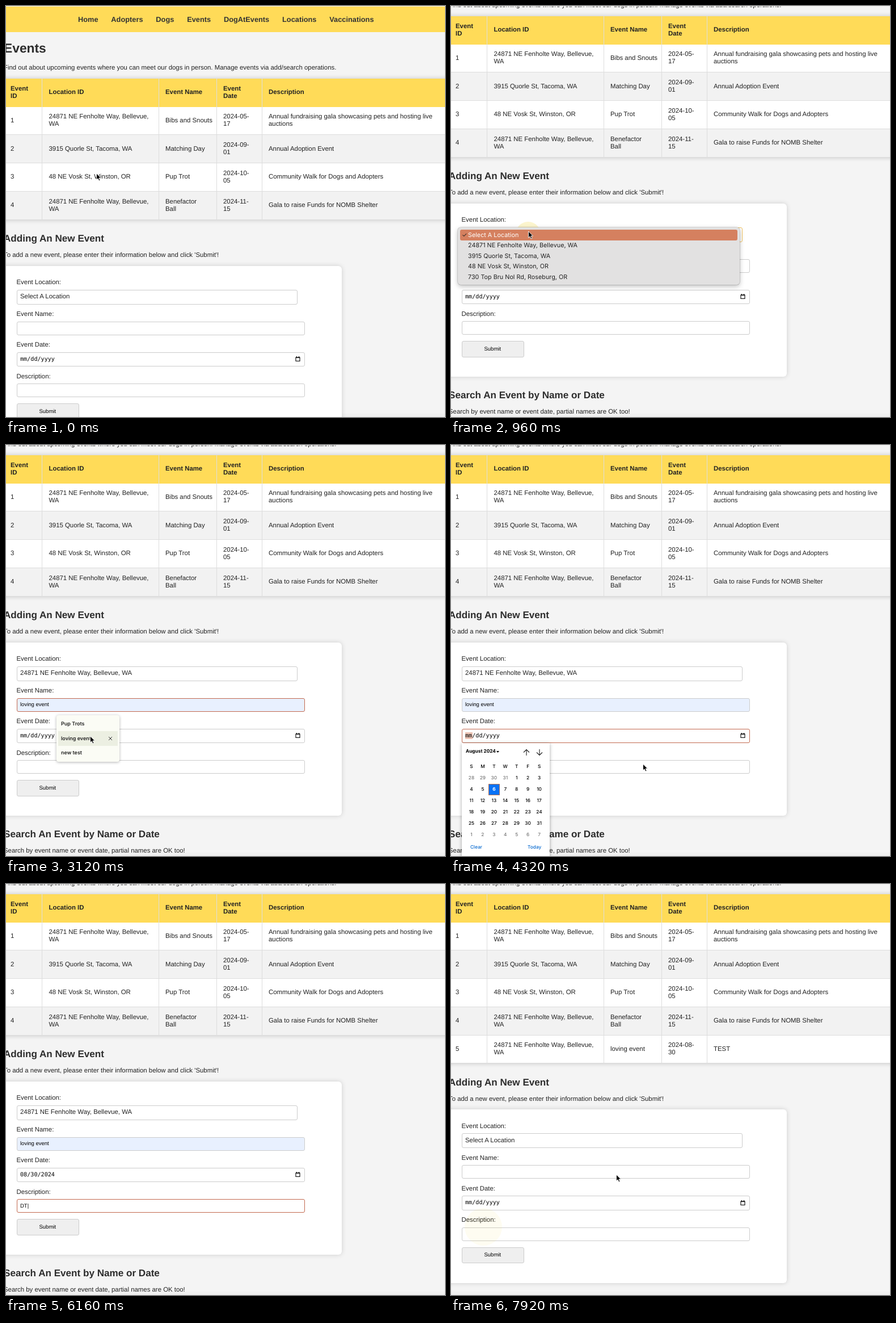
An HTML page that plays this animation: 774 px wide and 724 px high, repeating every 8000 ms.

```html
<!DOCTYPE html>
<html lang="en">
<head>
<meta charset="utf-8">
<title>Events</title>
<style>
html, body { margin: 0; width: 100%; height: 100%; overflow: hidden; }
#stage { position: relative; width: 774px; height: 724px; overflow: hidden; background: #f4f4f4;
  font: 11.4px/13px "Liberation Sans", Arial, sans-serif; color: #222; text-rendering: geometricPrecision; }
#stage div, #stage svg { position: absolute; box-sizing: border-box; }
.t { white-space: pre; }
.b { font-weight: bold; }
.h1 { font-size: 22.8px; font-weight: bold; color: #2d2d2d; }
.h2 { font-size: 17.1px; font-weight: bold; color: #2d2d2d; }
.small { font-size: 9.5px; color: #000; }
.mono { font-family: "DejaVu Sans Mono", monospace; font-size: 10.15px; color: #000; }
#page, #lower { left: 0; width: 774px; }
#lower { height: 0; }
nav { position: absolute; left: 127px; top: 17px; display: flex; gap: 22.8px; font: bold 12.8px/13px "Liberation Sans", Arial, sans-serif; color: #333; }
.yellow { background: #ffdb58; }
.table { box-shadow: 0 0 8px rgba(0,0,0,.2); background: #fff; }
.row { left: -10px; width: 800px; height: 49.75px; border-bottom: 1px solid #ddd; }
.rule { width: 1px; background: #ddd; }
.card { background: #fff; border-radius: 6px; box-shadow: 0 0 8px rgba(0,0,0,.16); }
.field { background: #fff; border: 1px solid #ccc; border-radius: 3px; }
.field.focus { border: 1.5px solid #c2694f; }
.field.gold { border-color: #f3c462; }
.field.filled { background: #e8f0fe; }
#submit { background: #efefef; border: 1px solid #ccc; border-radius: 3px; }
#menu { z-index: 5; left: 12px; top: 390px; width: 497px; height: 100.5px; border-radius: 5px; background: #e2e1e1;
  box-shadow: 0 0 0 .5px rgba(0,0,0,.25), 0 3px 9px rgba(0,0,0,.25); font: 10.8px/13px Inter, sans-serif; }
#menu .mark { left: 4px; width: 489px; height: 18.5px; border-radius: 3px; background: #d5805f; }
#popup { z-index: 5; left: 89px; top: 476px; width: 111px; height: 82px; border-radius: 4px; background: #fbfcf5;
  box-shadow: 0 1px 5px rgba(0,0,0,.3); font: 600 9px/13px Inter, sans-serif; }
#popup .mark { left: 3px; width: 105px; height: 26px; background: #ecefe2; }
#cal { z-index: 5; left: 19px; top: 525px; width: 155px; height: 210px; background: #fff;
  box-shadow: 0 1px 6px rgba(0,0,0,.35); font: 500 8.3px/13px Inter, sans-serif; color: #000; }
.day { width: 20px; text-align: center; }
.out { color: #777; }
.link { color: #0a6bd0; }
.pick { background: #0a72f5; border: 1px solid #b5704f; }
#cal .white { color: #fff; font-weight: bold; }
#ripple { border-radius: 50%; background: #f1d63c; }
#cursor { z-index: 10; }
</style>
</head>
<body>
<div id="stage"></div>
<script>
const text = (x, y, str, cls = "", id = "") =>
  `<div class="t ${cls}" id="${id}" style="left:${x}px;top:${y - 6.5 * str.split("\n").length}px">${str}</div>`;
const box = (x, y, w, h, cls, id = "") =>
  `<div class="${cls}" id="${id}" style="left:${x}px;top:${y}px;width:${w}px;height:${h}px"></div>`;
const range = (n, fn) => Array.from({ length: n }, (_, i) => fn(i)).join("");

const HOME = "24871 NE Fenholte Way, Bellevue,";
const places = ["Select A Location", `${HOME} WA`, "3915 Quorle St, Tacoma, WA",
  "48 NE Vosk St, Winston, OR", "730 Top Bru Nol Rd, Roseburg, OR"];
const events = [
  [1, `${HOME}\nWA`, "Bibs and Snouts", "2024-05-\n17", "Annual fundraising gala showcasing pets and hosting live\nauctions"],
  [2, places[2], "Matching Day", "2024-09-\n01", "Annual Adoption Event"],
  [3, places[3], "Pup Trot", "2024-10-\n05", "Community Walk for Dogs and Adopters"],
  [4, `${HOME}\nWA`, "Benefactor\nBall", "2024-11-\n15", "Gala to raise Funds for NOMB Shelter"],
  [5, `${HOME}\nWA`, "loving event", "2024-08-\n30", "TEST"],
];
const columns = [8, 75.5, 281, 383, 463];
const ROW = 49.75;

const cells = (row, y, cls) => row.map((str, i) => text(columns[i], y, String(str), cls)).join("");
const eventRow = (row, i) =>
  `<div id="row${i}" style="left:0;top:0">` +
  `<div class="row" style="top:${177.5 + ROW * i}px;background:${i % 2 ? "#f2f2f2" : "#fff"}"></div>` +
  cells(row, 202.3 + ROW * i) + "</div>";

const header = box(0, 0, 774, 45.5, "yellow") +
  `<nav>${["Home", "Adopters", "Dogs", "Events", "DogAtEvents", "Locations", "Vaccinations"].map(s => `<span>${s}</span>`).join("")}</nav>` +
  text(-4, 74.5, "Events", "h1") +
  text(-4, 109.5, "Find out about upcoming events where you can meet our dogs in person. Manage events via add/search operations.");

const table = box(-10, 127.5, 800, 0, "table", "table") +
  box(-10, 127.5, 800, 50, "yellow") + events.map(eventRow).join("") +
  cells(["Event\nID", "Location ID", "Event Name", "Event\nDate", "Description"], 152.5, "b") +
  [63, 269, 371, 450.5].map(x => box(x, 127.5, 1, 0, "rule")).join("");

const dateIcon = `<svg style="left:510px;top:507px" width="9" height="10">
  <path d="M1 2h7v6.5h-7zM1 2.5h7M2.5 0v2M6.5 0v2" fill="none" stroke="#000" stroke-width="1.1"/></svg>`;

const form = text(-4, 299.5, "Adding An New Event", "h2") +
  text(-4, 329.5, "To add a new event, please enter their information below and click 'Submit'!") +
  box(-10, 347.5, 602, 305.5, "card") +
  text(18.5, 377.5, "Event Location:") + text(18.5, 433.5, "Event Name:") +
  text(18.5, 487.5, "Event Date:") + text(18.5, 543, "Description:") +
  box(18.5, 389.5, 495.5, 26, "field", "place") + text(25, 402.5, places[0], "", "placeText") +
  box(18.5, 445.5, 508, 24, "field", "name") + text(25, 457.5, " ", "small", "nameText") +
  box(18.5, 499.5, 508, 25.5, "field", "date") + box(25, 506, 12.5, 12, "", "month") +
  text(25, 512, "mm/dd/yyyy", "mono", "dateText") + dateIcon +
  box(18.5, 555, 508, 24, "field", "desc") + text(25, 567, " ", "small", "descText") +
  box(18.5, 590, 110, 28.5, "", "submit") + text(58.5, 604, "Submit", "small") +
  text(-4, 685.5, "Search An Event by Name or Date", "h2") +
  text(-4, 715.5, "Search by event name or event date, partial names are OK too!");

const menu = `<div id="menu"><div class="mark" id="menuMark"></div>${text(7, 13, "✓")}` +
  places.map((p, i) => text(18, 13 + 18.5 * i, p, "", `item${i}`)).join("") + "</div>";

const popup = `<div id="popup"><div class="mark" id="popupMark"></div>` +
  ["Pup Trots", "loving event", "new test"].map((s, i) => text(8, 15.5 + 25.5 * i, s)).join("") +
  `<svg id="cross" style="left:91px" width="8" height="8"><path d="M1 1l6 6M7 1l-6 6" stroke="#333" stroke-width="1"/></svg></div>`;

const dayCell = i => {
  const n = i - 3, label = n < 1 ? n + 31 : n > 31 ? n - 31 : n;
  const cls = n === 6 ? "white" : n < 1 || n > 31 ? "out" : "";
  return text(7 + 19.93 * (i % 7), 62.5 + 19.95 * Math.floor(i / 7), String(label), `day ${cls}`);
};
const arrow = (x, turn) => `<svg style="left:${x}px;top:10px" width="12" height="13">
  <path transform="rotate(${turn} 6 6.5)" d="M6 12V1.5M1 6.5l5-5l5 5" fill="none" stroke="#222" stroke-width="1.1"/></svg>`;
const calendar = `<div id="cal">${text(7, 15.5, "August 2024", "b")}` +
  `<svg style="left:61px;top:14px" width="6" height="4"><path d="M0 0h5l-2.500 3z"/></svg>` +
  arrow(108, 0) + arrow(131, 180) + box(47, 72, 20, 20, "pick") +
  range(7, i => text(7 + 19.93 * i, 42, "SMTWTFS"[i], "day")) + range(42, dayCell) +
  text(15, 184, "Clear", "link") + text(116, 184, "Today", "link") + "</div>";

const $ = id => document.getElementById(id);
$("stage").innerHTML = box(0, 718, 774, 6, "") +
  `<div id="page">${header}${table}<div id="lower">${form}${menu}${popup}${calendar}</div></div>` +
  `<div id="ripple"></div>` +
  `<svg id="cursor" width="13" height="18"><path d="M1.500 1v11.200l2.600-2.400 1.900 4.200 2-.9-1.900-4.100h3.500z" fill="#000" stroke="#fff" stroke-width=".9"/></svg>` +
  `<div style="z-index:11;left:0;top:0;width:774px;height:1px;background:#f2f2f0"></div>`;
$("stage").firstElementChild.style.background = "#f0f0f0";

const pointer = [[0, 159, 295], [480, 159, 295], [800, 136, 397], [960, 136, 397], [1360, 103, 418], [1600, 103, 420],
  [1760, 197, 428], [2000, 150, 455], [2400, 150, 458], [2880, 148, 513], [3200, 148, 513], [3760, 512, 510],
  [3920, 512, 510], [4320, 338, 562], [4960, 136, 665], [5200, 136, 665], [5600, 130, 566], [7280, 130, 566],
  [7520, 57, 602], [7600, 57, 602], [7920, 291, 512]];
const clicks = [[880, 136, 402], [1600, 103, 422], [2080, 150, 457], [3200, 148, 516],
  [3840, 514, 512], [5120, 136, 667], [5680, 130, 567], [7520, 57, 604]];
const typing = [[0, ""], [6080, "D"], [6160, "DT"], [6240, "D"], [6320, ""], [6640, "T"], [6880, "TE"], [7120, "TES"], [7200, "TEST"]];

const clamp = v => Math.min(1, Math.max(0, v));
const ease = p => p * p * (3 - 2 * p);
const within = (t, from, to) => t >= from && t < to;
const latest = (list, t) => list.filter(k => k[0] <= t).pop();
const show = (id, on) => { $(id).style.display = on ? "" : "none"; };

function along(path, t) {
  const a = latest(path, t), b = path[path.indexOf(a) + 1] || a;
  const p = ease(clamp((t - a[0]) / (b[0] - a[0] || 1)));
  return [a[1] + (b[1] - a[1]) * p, a[2] + (b[2] - a[2]) * p];
}

function drawPage(t, done) {
  $("page").style.top = -Math.round(110 * ease(clamp((t - 40) / 560))) + "px";
  $("lower").style.top = 110 + (done ? ROW : 0) + "px";
  const rows = done ? 5 : 4;
  $("table").style.height = 50 + ROW * rows + "px";
  document.querySelectorAll(".rule").forEach(r => { r.style.height = 50 + ROW * rows + "px"; });
  show("row4", done);
}

function drawForm(t, done) {
  const named = within(t, 2720, 7840), dated = within(t, 5200, 7840);
  const inDesc = within(t, 5680, 7600);
  $("placeText").textContent = within(t, 1920, 7840) ? places[1] : places[0];
  $("nameText").textContent = named ? "loving event" : within(t, 2080, 2720) ? "|" : "";
  $("dateText").textContent = dated ? "08/30/2024" : "mm/dd/yyyy";
  $("descText").textContent = done ? "" : latest(typing, t)[1] + (inDesc ? "|" : "");
  $("place").classList.toggle("gold", within(t, 880, 2080));
  $("name").classList.toggle("focus", within(t, 2080, 3840));
  $("name").classList.toggle("filled", named);
  $("date").classList.toggle("focus", within(t, 3840, 5680));
  $("desc").classList.toggle("focus", inDesc);
  $("month").style.background = within(t, 3840, 5200) ? "#ecc4b5" : "none";
}

function drawOverlays(t) {
  show("menu", within(t, 880, 2000));
  $("menu").style.opacity = 1 - .18 * clamp((t - 1600) / 160) - .82 * clamp((t - 1760) / 240);
  const chosen = t < 1200 ? 0 : 1;
  $("menuMark").style.top = 4 + 18.5 * chosen + "px";
  places.forEach((_, i) => { $(`item${i}`).style.color = i === chosen ? "#fff" : ""; });

  show("popup", within(t, 2160, 3280));
  const hovered = t >= 2720;
  show("popupMark", hovered);
  show("cross", hovered);
  $("popupMark").style.top = "27.5px";
  $("cross").style.top = "37px";

  show("cal", within(t, 3920, 5280));
}

function drawPointer(t) {
  const [x, y] = along(pointer, t);
  $("cursor").style.left = x - 1.5 + "px";
  $("cursor").style.top = y - 1 + "px";
  show("cursor", !within(t, 6080, 7280));

  const click = latest(clicks, t), age = click ? t - click[0] : 999;
  show("ripple", age < 460);
  if (age >= 460) return;
  const r = 19 + age * .035, s = $("ripple").style;
  s.left = click[1] - r + "px";
  s.top = click[2] - r + "px";
  s.width = s.height = 2 * r + "px";
  s.opacity = .5 * Math.min(clamp(age / 160), clamp((440 - age) / 280));
  s.zIndex = t < 1500 ? 1 : 9;
}

function frame(now) {
  const t = Math.floor((now % 8000) / 80) * 80;
  const done = t >= 7840;
  drawPage(t, done);
  drawForm(t, done);
  drawOverlays(t);
  drawPointer(t);
  requestAnimationFrame(frame);
}
frame(0);
</script>
</body>
</html>
```
